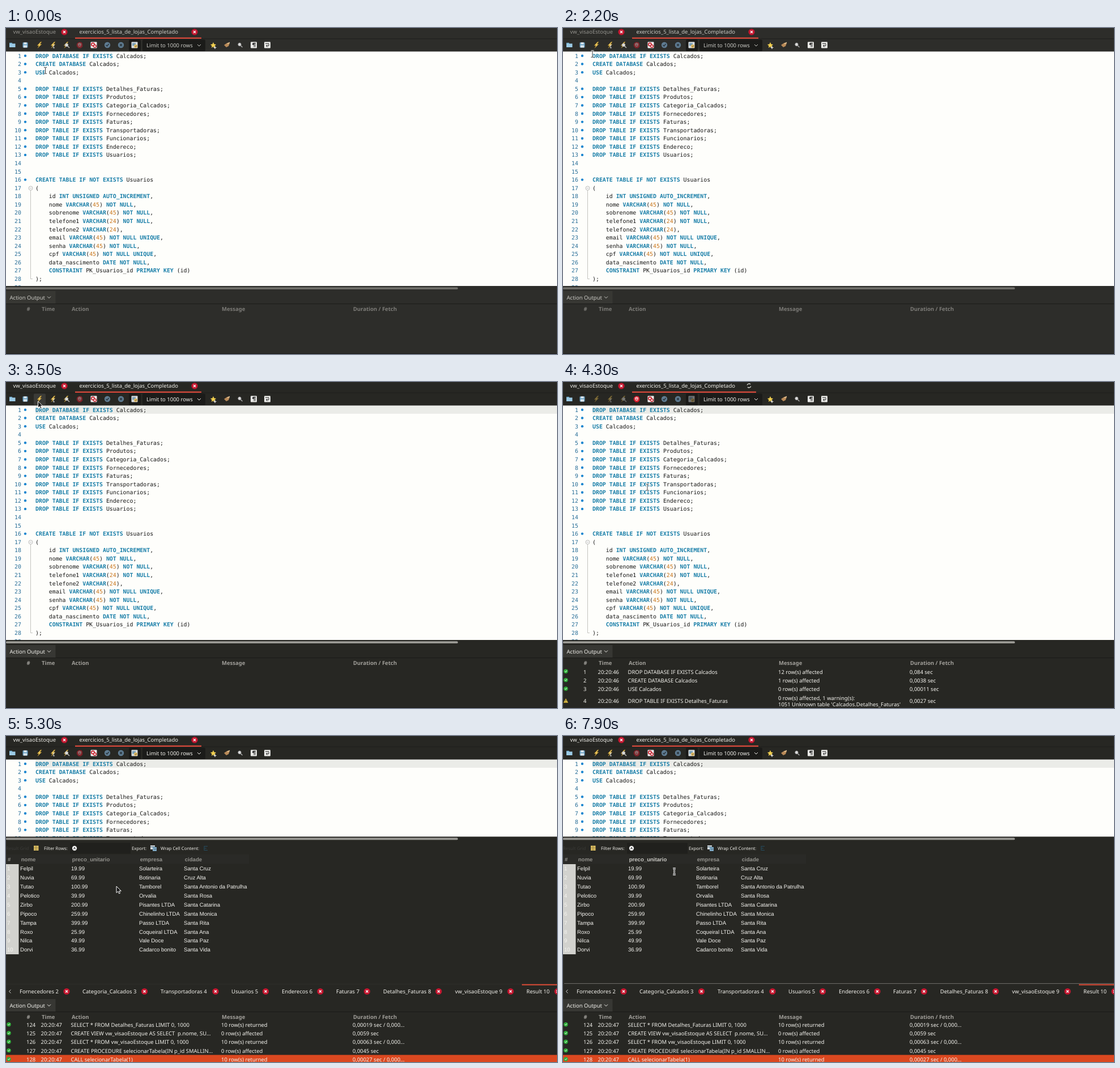
Recreate the animation shown at these times as an HTML page. Size 973 px wide and 575 px high, loop 8000 ms.

```html
<!DOCTYPE html>
<html lang="pt">
<head>
<meta charset="utf-8">
<title>SQL editor</title>
<style>
html, body { margin: 0; width: 100%; height: 100%; overflow: hidden; background: #272723; }
svg { display: block; width: 973px; height: 575px;
  --bg: #2d2d2a; --tab: #94938e; --text: #cbcac5; --head: #7d7c78; --bar: #706f6a; }
svg.focus { --bg: #272723; --tab: #efeee9; --text: #f3f2ed; --head: #a19f9a; --bar: #9b9a95; }
text { white-space: pre; text-rendering: geometricPrecision; font: 9.5px "Noto Sans", sans-serif; fill: var(--text); }
.tab { fill: var(--tab); }
.head { font-weight: bold; fill: var(--head); }
.row { font-size: 9.45px; fill: #f5f4ef; }
.code { font: 9.9px "DejaVu Sans Mono", monospace; fill: #161616; }
.code .kw { font-weight: bold; fill: #1a7fa9; }
.code .num { fill: #c9761c; }
.line { font: 9.9px "DejaVu Sans Mono", monospace; fill: #286e98; text-anchor: end; }
.cell { font: 9.6px "Liberation Sans", Arial, sans-serif; fill: #f5f4f0; }
.col { font: bold 9.6px "Liberation Sans", Arial, sans-serif; fill: #92918c; }
.small { font-size: 7.8px; fill: #efeee9; }
.stop { opacity: .5; }
.busy .stop { opacity: 1; }
.busy .run { opacity: .45; }
</style>
</head>
<body>
<svg id="stage" viewBox="0 0 973 575"></svg>
<script>
const PITCH = 14.573;
const SQL = `DROP DATABASE IF EXISTS Calcados;
CREATE DATABASE Calcados;
USE Calcados;

DROP TABLE IF EXISTS Detalhes_Faturas;
DROP TABLE IF EXISTS Produtos;
DROP TABLE IF EXISTS Categoria_Calcados;
DROP TABLE IF EXISTS Fornecedores;
DROP TABLE IF EXISTS Faturas;
DROP TABLE IF EXISTS Transportadoras;
DROP TABLE IF EXISTS Funcionarios;
DROP TABLE IF EXISTS Endereco;
DROP TABLE IF EXISTS Usuarios;


CREATE TABLE IF NOT EXISTS Usuarios
(
    id INT UNSIGNED AUTO_INCREMENT,
    nome VARCHAR(45) NOT NULL,
    sobrenome VARCHAR(45) NOT NULL,
    telefone1 VARCHAR(24) NOT NULL,
    telefone2 VARCHAR(24),
    email VARCHAR(45) NOT NULL UNIQUE,
    senha VARCHAR(45) NOT NULL,
    cpf VARCHAR(45) NOT NULL UNIQUE,
    data_nascimento DATE NOT NULL,
    CONSTRAINT PK_Usuarios_id PRIMARY KEY (id)
);
`.split('\n');

const PRODUCTS = `Felpil|19.99|Solarteira|Santa Cruz
Nuvia|69.99|Botinaria|Cruz Alta
Tutao|100.99|Tamborel|Santa Antonio da Patrulha
Pelotico|39.99|Orvalia|Santa Rosa
Zirbo|200.99|Pisantes LTDA|Santa Catarina
Pipoco|259.99|Chinelinho LTDA|Santa Monica
Tampa|399.99|Passo LTDA|Santa Rita
Roxo|25.99|Coqueiral LTDA|Santa Ana
Nilca|49.99|Vale Doce|Santa Paz
Dorvi|36.99|Cadarco bonito|Santa Vida`.split('\n').map(r => r.split('|'));

const FIRST_LOG = [
  [1, 'DROP DATABASE IF EXISTS Calcados', '12 row(s) affected', '0,084 sec'],
  [2, 'CREATE DATABASE Calcados', '1 row(s) affected', '0,0038 sec'],
  [3, 'USE Calcados', '0 row(s) affected', '0,00011 sec'],
  [4, 'DROP TABLE IF EXISTS Detalhes_Faturas', '', '0,0027 sec']];
const LAST_LOG = [
  [124, 'SELECT * FROM Detalhes_Faturas LIMIT 0, 1000', '10 row(s) returned', '0,00019 sec / 0,000...'],
  [125, 'CREATE VIEW vw_visaoEstoque AS SELECT  p.nome, SU...', '0 row(s) affected', '0,0059 sec'],
  [126, 'SELECT * FROM vw_visaoEstoque LIMIT 0, 1000', '10 row(s) returned', '0,00063 sec / 0,000...'],
  [127, 'CREATE PROCEDURE selecionarTabela(IN p_id SMALLIN...', '0 row(s) affected', '0,0045 sec'],
  [128, 'CALL selecionarTabela(1)', '10 row(s) returned', '0,00027 sec / 0,000...']];

// label, text x, close button x
const RESULT_TABS = [['Fornecedores 2', 24, 107], ['Categoria_Calcados 3', 135, 244.5],
  ['Transportadoras 4', 273, 370], ['Usuarios 5', 398, 458.5], ['Enderecos 6', 487, 555],
  ['Faturas 7', 583, 637.5], ['Detalhes_Faturas 8', 666, 764], ['vw_visaoEstoque 9', 793, 891],
  ['Result 10', 919, 974]];

const text = (x, y, s, cls = '', extra = '') => `<text x="${x}" y="${y}" class="${cls}" ${extra}>${s}</text>`;
const rect = (x, y, w, h, fill, extra = '') => `<rect x="${x}" y="${y}" width="${w}" height="${h}" fill="${fill}" ${extra}/>`;
const dot = (x, y, r, fill, extra = '') => `<circle cx="${x}" cy="${y}" r="${r}" fill="${fill}" ${extra}/>`;
const path = (d, stroke, w = 1, fill = 'none') => `<path d="${d}" stroke="${stroke}" stroke-width="${w}" fill="${fill}"/>`;
const group = (x, y, body, extra = '') => `<g transform="translate(${x} ${y})" ${extra}>${body}</g>`;
const close = (x, y) => group(x, y, dot(0, 0, 5.6, '#c4162f') + path('M-2-2L2 2M2-2L-2 2', '#fff', 1.3));
const chevron = (x, y) => path(`M${x - 3} ${y - 1.5}l3 3 3-3`, 'var(--text)');
const highlight = s => s.replace(/\b[A-Z][A-Z_]+\b|\b\d+\b/g,
  w => `<tspan class="${/\d/.test(w) ? 'num' : 'kw'}">${w}</tspan>`);

function toolbar() {
  const bolt = path('M2-5.5L-4 1H-1L-3 5.5 4-1.5H1L4-5.5Z', '#8a6a20', .5, '#f0c95a');
  const lens = (x, y, c) => dot(x, y, 2.6, '#ddd', `stroke="${c}"`) + path(`M${x + 2} ${y + 2}l3 3`, c, 1.5);
  const badge = mark => dot(0, 0, 5.2, '#5f7c92') + path(mark, '#28323a', 1.4);
  const page = rect(-5.5, -5.5, 11, 11, '#e9e9e6', 'rx="1"');
  const icons = [
    [11, rect(-5, -4, 5, 3, '#6ba3c4') + rect(-5, -2.5, 10.5, 6.5, '#9ccbe6')],
    [34, rect(-4.5, -4.5, 9, 9, '#6fa4c6', 'rx="1"') + rect(-2.5, -4.5, 5, 3, '#e8eef2') + rect(-3, .5, 6, 4, '#dce6ec')],
    [59, bolt, 'run'],
    [83, bolt + path('M1 0v5M0 0h3M0 5h3', '#ddd'), 'run'],
    [106, bolt + lens(1, 0, '#b9b9b4'), 'run'],
    [130, path('M-2-5H3L5-2V3L2 5.5H-2L-5 2V-2Z', '#a91524', .6, '#d9202f') + path('M-2 1V-3M0 0V-4M2 1V-3M-2 2H2', '#fff', 1.2), 'stop'],
    [155, rect(-5.5, -5.5, 11, 11, '#eee', 'rx="1"') + dot(-1.5, -1, 2.6, 'none', 'stroke="#c9202c" stroke-width="1.6"') + dot(2, 2, 2.3, '#fff', 'stroke="#c9202c" stroke-width="1.5"')],
    [179, badge('M-2.5 0l2 2 3-4')],
    [203, badge('M-2-2L2 2M2-2L-2 2')],
    [227, rect(-5.5, -5.5, 11, 11, '#d9dde0', 'rx="1"') + rect(-4, -3.5, 6, 5, '#7ba0b7') + dot(2, 2, 3, '#e3b95a') + path('M.8 2l1 1 2-2', '#555'), 'run'],
    [366, path('M0-5L1.5-1.5 5-1 2.5 1.5 3 5 0 3-3 5-2.5 1.5-5-1-1.5-1.5Z', 'none', 0, '#f2d04f') + path('M3 2v5M.5 4.5h5', '#eee', 1.2)],
    [390, path('M-5 0L1-4 5-3 3 2-1 4Z', 'none', 0, '#b98a58') + path('M1-2L5-4.5', '#e2c394', 1.6)],
    [413, lens(-.5, -1, '#aaa')],
    [437.5, page + path('M.5-3.5V3.5M2.5-3.5V3.5M3.5-3.5H-1', '#333') + dot(-.8, -1.8, 1.8, '#333')],
    [461.5, page + path('M-3.5-2.5H2.5V1.5H-2M0-.5L-2.2 1.5 0 3.5', '#333')]
  ];
  return rect(217, 20.5, 21, 20.5, '#191917', 'rx="2"') + rect(241, 20.5, 111, 20.5, '#1b1b19', 'rx="2"') +
    rect(49, 20.5, 21, 20, '#3b3b37', 'id="hover" rx="2"') +
    icons.map(([x, body, cls = '']) => group(x, 30, body, `class="${cls}"`)).join('') +
    text(248, 33.7, 'Limit to 1000 rows') + chevron(341, 30.5);
}

function editor() {
  const lines = SQL.map((s, i) => {
    const y = 52.6 + i * PITCH;
    return text(27, y, i + 1, 'line') + text(52, y, highlight(s), 'code') +
      (/^(DROP|CREATE|USE)/.test(s) ? dot(34, y - 3.6, 2.2, '#1b86cf') : '');
  }).join('');
  return rect(0, 41.5, 973, 414, '#fefefb') + rect(52, 42, 921, 14, '#ebece8', 'id="current"') + lines +
    dot(43.5, 282.5, 3.5, '#fff', 'stroke="#a9a9a5" stroke-width=".8"') +
    path('M41.5 282.5h4M43.5 286V442.5H47', '#b4b4b0', .8) +
    rect(52, 42.5, 1, 13, '#111', 'id="caret"') + rect(0, 455, 973, 8.5, 'var(--bg)');
}

function results() {
  const cols = [25, 115, 235, 314];
  const heads = ['nome', 'preco_unitario', 'empresa', 'cidade'];
  const rows = PRODUCTS.map((r, i) => {
    const y = 237.3 + i * 15.89;
    return text(2, y, i + 1, 'cell') + r.map((s, k) => text(cols[k], y, s, 'cell')).join('');
  }).join('');
  return rect(0, 177.5, 973, 286, '#272723') +
    text(0, 200.7, 'Result Grid', 'small', 'style="fill:#3b3b38"') +
    rect(49, 193.5, 8.5, 8.5, '#e6c766') + path('M49 196.5h8.5M49 199.3h8.5M53 193.5v8.5', '#7d6a35', .7) +
    text(67, 200.7, 'Filter Rows:', 'small') + rect(113, 188.5, 107, 19, '#20201d') +
    dot(121, 198, 4.2, '#eee') + path('M119.5 199.5l1.5-3 1.5 3', '#222') +
    text(222, 200.7, 'Export:', 'small') +
    rect(255, 193, 8, 7, '#d6dde2') + rect(259, 196, 7, 7, '#7ea9c6') + path('M255 195.5h8M261 199.5h4', '#4b6473') +
    text(273, 200.7, 'Wrap Cell Content:', 'small') + path('M350 194.5h6M350 198h4M350 201.5h6M350 194v8', '#254c61') +
    rect(0, 209, 429, 16.5, '#2a2a27') + text(3, 220.5, '#', 'col') +
    heads.map((s, k) => text(cols[k] + 1.7, 220.5, s, 'col', `id="col${k}"`)).join('') +
    rect(0, 226, 22.5, 159, '#d2d2ce') + rows +
    rect(0, 437.5, 973, .6, '#353531') + rect(2, 436, 971, 1, '#6a6964', 'id="split"') +
    rect(911, 437.7, 62, 2, '#dc4a35') + path('M8.5 447.5l-3 3 3 3', '#ddd') +
    RESULT_TABS.map(([s, x, c]) => text(x, 453.8, s) + close(c, 450.5)).join('');
}

function logRow([n, action, message, time], y, icon) {
  return icon + text(36, y, n, 'row') + text(61.5, y, n > 100 ? '20:20:47' : '20:20:46', 'row') +
    text(114.5, y, action, 'row') + text(380, y, message, 'row') + text(612, y, time, 'row');
}
const okIcon = y => dot(5, y, 3.7, '#2fae3a') + path(`M3.3 ${y}l1.3 1.3 2.2-2.6`, '#fff');

function output() {
  const warning = path('M5 558.5L8.7 565.5H1.3Z', '#c9a227', .6, '#f0cf4a') + path('M5 560.7v2.3M5 563.7v1', '#333');
  const first = FIRST_LOG.map((r, i) => i < 3
    ? logRow(r, 514.7 + i * 15.2, okIcon(510.3 + i * 15.3))
    : logRow(r, 565.7, warning)).join('') +
    text(380, 560.5, '0 row(s) affected, 1 warning(s):', 'row') +
    text(380, 571.5, "1051 Unknown table 'Calcados.Detalhes_Faturas'", 'row');
  const last = rect(0, 562.5, 973, 12.5, '#db4820') +
    LAST_LOG.map((r, i) => logRow(r, 512.9 + i * 15.2, okIcon(508.7 + i * 15.3))).join('');
  return rect(0, 463.5, 973, 111.5, 'var(--bg)') + rect(0, 464, 87.5, 22, '#373733') +
    rect(0, 486, 973, 1, '#1b1b19') + text(6.5, 478.5, 'Action Output') + chevron(76, 475) +
    [['#', 36.5], ['Time', 63], ['Action', 116], ['Message', 381], ['Duration / Fetch', 613]]
      .map(([s, x]) => text(x, 498.5, s, 'head')).join('') +
    `<g id="first">${first}</g><g id="last">${last}</g>` + rect(0, 574, 973, 1, '#1b1b19', 'id="edge"');
}

const ARROW = 'M0 0V11.5L2.7 9 4.6 13 6.5 12.1 4.7 8.3H8.3Z';
const BEAM = 'M-2.5-5.5H-.6L0-5 .6-5.5H2.5M0-5V5M-2.5 5.5H-.6L0 5 .6 5.5H2.5';
const stage = document.getElementById('stage');
stage.innerHTML = rect(0, 0, 973, 575, 'var(--bg)') + rect(0, 18.5, 973, 1, '#1f1f1d') +
  text(12.5, 10, 'vw_visaoEstoque', 'tab') + close(103, 7) +
  text(129.5, 10, 'exercicios_5_lista_de_lojas_Completado') +
  `<g id="shut">${close(333, 7)}</g>` +
  `<g id="spin">${path('M-3.3-1A3.5 3.5 0 0 1 2.5-2.5M3.3 1A3.5 3.5 0 0 1-2.5 2.5', '#d8d7d2', 1.3)}</g>` +
  rect(122, 16.7, 223, 2.2, '#dc4a3c', 'id="under"') +
  toolbar() + editor() + `<g id="results">${results()}</g>` +
  rect(0, 457.3, 798, 3.8, 'var(--bar)', 'id="scroll" rx="1.9"') + output() +
  `<g id="arrow">${path(ARROW, '#fff', 1, '#141414')}</g>` +
  `<g id="beam">${path(BEAM, '#fff', 2.6) + path(BEAM, '#222', .9)}</g>`;

const el = {};
stage.querySelectorAll('[id]').forEach(n => el[n.id] = n);
const show = (id, on) => el[id].setAttribute('display', on ? 'inline' : 'none');
const within = (t, a, b) => t >= a && t < b;

// time, x, y of the pointer
const POINTER = [[100, 69.5, 75], [600, 41, 7], [1300, 41, 7], [1400, 42, 8], [1600, 41, 42], [1800, 41, 42],
  [2000, 45, 46], [2100, 45, 46], [2200, 52, 46], [3100, 52, 46], [3500, 56.5, 34], [3700, 57, 27],
  [3900, 57, 27], [4500, 195, 265], [7700, 195, 265], [7800, 196, 216], [7900, 196.5, 239]];

function pointer(t) {
  const i = POINTER.findIndex(k => k[0] > t);
  if (i === 0) return POINTER[0].slice(1);
  if (i < 0) return POINTER[POINTER.length - 1].slice(1);
  const [a, ax, ay] = POINTER[i - 1], [b, bx, by] = POINTER[i];
  const p = (t - a) / (b - a);
  return [ax + (bx - ax) * p, ay + (by - ay) * p];
}

function draw(time) {
  const t = Math.floor(time / 100) * 100;
  const busy = within(t, 3900, 5300), done = t >= 5300;
  stage.setAttribute('class', (t >= 2800 ? 'focus ' : '') + (busy ? 'busy' : ''));
  show('current', t >= 2600);
  show('caret', within(t, 2600, 3300) || within(t, 5700, 6400) || within(t, 7100, 7800));
  show('hover', within(t, 3300, 4000));
  show('shut', !busy);
  show('spin', busy);
  el.spin.setAttribute('transform', `translate(328.5 6.5) rotate(${t < 4800 ? 0 : t < 5100 ? 60 : 120})`);
  el.under.setAttribute('width', busy ? 219 : 223);
  show('results', done);
  show('first', within(t, 4100, 5300));
  show('last', done);
  show('edge', t < 4100);
  el.scroll.setAttribute('y', done ? 179.5 : 457.3);
  show('split', t >= 7800);
  el.col1.style.fill = t >= 7800 ? '#c9c8c3' : '';

  const [x, y] = pointer(t);
  const beam = done ? t >= 7900 : x >= 48 && y >= 42;
  show('beam', beam);
  show('arrow', !beam);
  el[beam ? 'beam' : 'arrow'].setAttribute('transform', `translate(${x} ${y})`);
}

const start = performance.now();
function tick() {
  draw((performance.now() - start) % 8000);
  requestAnimationFrame(tick);
}
tick();
</script>
</body>
</html>
```
